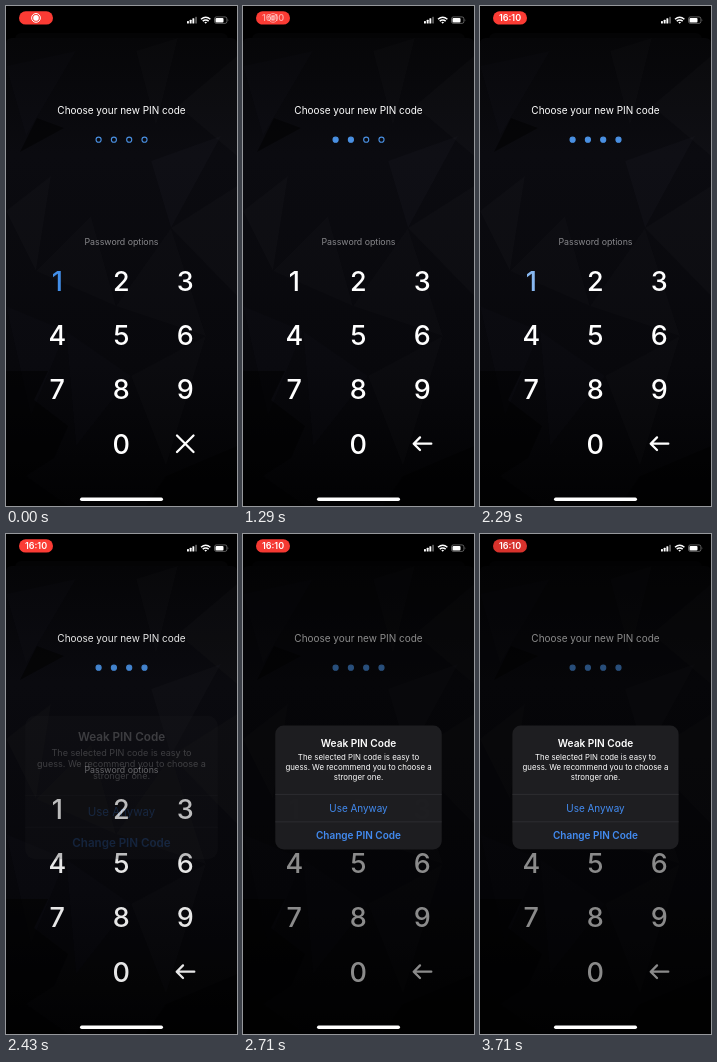
An HTML page that plays this animation: 231x500 px, repeating every 3.85 s.

```html
<!DOCTYPE html>
<html lang="en">
<head>
<meta charset="utf-8">
<title>Choose a PIN code</title>
<style>
  html, body { margin: 0; width: 100%; height: 100%; overflow: hidden; background: #000; }
  svg { display: block; width: 100%; height: 100%; }
  text { font-family: Inter, "Liberation Sans", sans-serif; text-anchor: middle; fill: #fff; }
  .key { font-size: 27px; font-weight: 500; }
  .icon { fill: none; stroke: #fff; stroke-width: 2.3; stroke-linecap: round; stroke-linejoin: round; }
  .blue { fill: #438cf2; }
  .bold { font-weight: 600; }
</style>
</head>
<body>
<svg viewBox="0 0 231 500" preserveAspectRatio="none">
  <defs>
    <linearGradient id="wall" x1="0" y1="0" x2="0" y2="1">
      <stop offset="0" stop-color="#060608"/>
      <stop offset=".25" stop-color="#0b0b10"/>
      <stop offset=".7" stop-color="#08080c"/>
      <stop offset=".9" stop-color="#040406"/>
      <stop offset="1" stop-color="#020203"/>
    </linearGradient>
  </defs>
  <rect width="231" height="500" fill="#000"/>
  <rect x="9" y="27" width="213" height="20" rx="6" fill="#040405"/>
  <path d="M0 500V38Q0 32 6 32H225Q231 32 231 38V500Z" fill="url(#wall)"/>
  <g id="facets" fill="#b0b0cc"></g>
  <path d="M31 112L58 122L14 146ZM0 365H42L28 394L62 420L48 452L20 470L62 500H0ZM160 470L231 440V500H140Z" fill="#000" opacity=".5"/>

  <text x="115.5" y="107.6" font-size="9.98">Choose your new PIN code</text>
  <g id="dots"></g>
  <text x="115.5" y="239.2" font-size="8.8" style="fill:#88888c">Password options</text>
  <g id="keys"></g>
  <path id="cross" class="icon" d="M171 429.5L187.5 446M187.5 429.5L171 446"/>
  <path id="back" class="icon" d="M188.3 437.7H170.8M177 431.4L170.7 437.7L177 444"/>

  <rect id="dim" width="231" height="500" fill="#000"/>

  <g id="alert">
    <rect x="32.4" y="191.5" width="166.2" height="123.8" rx="8.5" fill="#1e1e21"/>
    <path d="M32.4 260.4H198.6M32.4 287.8H198.6" stroke="#343438" stroke-width=".7"/>
    <text class="bold" x="115.5" y="213.2" font-size="10.1">Weak PIN Code</text>
    <g font-size="7.82">
      <text x="115.5" y="226">The selected PIN code is easy to</text>
      <text x="115.5" y="236">guess. We recommend you to choose a</text>
      <text x="115.5" y="246">stronger one.</text>
    </g>
    <text class="blue" x="115.5" y="277.9" font-size="9.9">Use Anyway</text>
    <text class="blue bold" x="115.5" y="305.2" font-size="10">Change PIN Code</text>
  </g>

  <rect id="pill" x="13" y="5.2" width="34" height="13.4" rx="6.7" fill="#fb3b34"/>
  <g id="rec">
    <circle cx="30" cy="11.9" r="4.4" fill="none" stroke="#fff" stroke-width="1"/>
    <circle cx="30" cy="11.9" r="2.8" fill="#fff"/>
  </g>
  <text id="clock" class="bold" x="30" y="15.3" font-size="9">16:10</text>

  <g fill="#fff">
    <rect x="181" y="15" width="1.9" height="2.5" rx=".5"/>
    <rect x="183.7" y="13.7" width="1.9" height="3.8" rx=".5"/>
    <rect x="186.4" y="12.2" width="1.9" height="5.3" rx=".5"/>
    <rect x="189.1" y="10.7" width="1.9" height="6.8" rx=".5" opacity=".35"/>
  </g>
  <g fill="none" stroke="#fff" stroke-width="1.5">
    <path d="M195 13.2Q199.7 9.2 204.4 13.2M196.7 15.1Q199.7 12.7 202.7 15.1"/>
    <path d="M198.3 16.3Q199.7 15.3 201.1 16.3L199.7 17.7Z" fill="#fff" stroke="none"/>
  </g>
  <rect x="208.5" y="10.9" width="12.4" height="6.5" rx="1.9" fill="none" stroke="#fff" stroke-opacity=".5" stroke-width=".7"/>
  <rect x="209.5" y="11.9" width="8" height="4.5" rx="1" fill="#fff"/>
  <path d="M221.8 12.9Q223 14.1 221.8 15.3Z" fill="#fff" opacity=".5"/>
  <rect x="74" y="491.6" width="83" height="3.4" rx="1.7" fill="#fff"/>
</svg>
<script>
const LOOP = 3850, FPS = 7;
const TOUCHES = [[-100, 90], [600, 760], [1340, 1490], [2060, 2230]];
const FILLS = [60, 600, 1340, 2060];
const CLOCK_AT = 1150, ALERT_AT = 2389;
const BLUE = [66, 142, 232], WHITE = [255, 255, 255];

const $ = id => document.getElementById(id);
const clamp = x => Math.min(1, Math.max(0, x));
const ramp = (t, start, length) => clamp((t - start) / length);
const mix = (a, b, k) => `rgb(${a.map((v, i) => Math.round(v + (b[i] - v) * k))})`;

function add(parent, tag, attrs, text = "") {
  const el = document.createElementNS("http://www.w3.org/2000/svg", tag);
  for (const name in attrs) el.setAttribute(name, attrs[name]);
  el.textContent = text;
  return $(parent).appendChild(el);
}

// Faint low-poly wallpaper: outline and opacity
[
  ["0,60 70,45 20,130", .012], ["130,45 172,32 150,120", .014],
  ["172,100 231,50 231,150", .018], ["145,155 215,130 165,222", .025],
  ["0,205 45,170 30,265", .02], ["30,265 85,210 110,300", .016],
  ["165,222 231,180 231,290", .018], ["110,300 165,222 200,330", .014],
  ["0,300 60,325 25,410", .012], ["125,370 200,330 160,460", .014],
  ["60,325 125,370 70,440", .012]
].forEach(([points, opacity]) => add("facets", "polygon", { points, opacity }));

const dots = FILLS.map((_, i) => add("dots", "circle", {
  cx: 92.6 + i * 15.3, cy: 133.7, r: 2.55, fill: "#4a90e2", stroke: "#4a90e2", "stroke-width": 1.1
}));

const keys = [..."1234567890"].map((digit, i) => {
  const col = digit === "0" ? 1 : i % 3, row = Math.floor(i / 3);
  return add("keys", "text", { class: "key", x: 51.3 + col * 64, y: 284.9 + row * 54.2 }, digit);
});

// Critically damped rise from 0 to 1
function spring(ms) {
  const x = Math.max(0, ms) * .0214;
  return 1 - (1 + x) * Math.exp(-x);
}

function draw(t) {
  const glow = Math.max(...TOUCHES.map(([down, up]) =>
    t < down ? 0 : 1 - ramp(t, up, 150)));
  keys[0].style.fill = mix(WHITE, BLUE, glow);

  dots.forEach((dot, i) => dot.setAttribute("fill-opacity", ramp(t, FILLS[i], 80)));
  const typed = t >= FILLS[0];
  $("cross").setAttribute("opacity", typed ? 0 : 1);
  $("back").setAttribute("opacity", typed ? 1 : 0);

  const clock = ramp(t, CLOCK_AT, 250);
  $("rec").setAttribute("opacity", 1 - clock);
  $("clock").setAttribute("opacity", clock);
  $("pill").setAttribute("opacity", 1 - .14 * ramp(t, 2500, 1200));

  const shown = spring(t - ALERT_AT);
  $("dim").setAttribute("opacity", .46 * shown);
  $("alert").setAttribute("opacity", shown);
  $("alert").setAttribute("transform",
    `translate(115.5 253) scale(${1 + .2 * (1 - shown)}) translate(-115.5 -253)`);
}

function stepTime(ms) {
  const cs = Math.floor((ms % LOOP) / 10);
  return Math.floor((cs + .5) * FPS / 100) * 1000 / FPS;
}

const begin = performance.now();
function tick() {
  draw(stepTime(performance.now() - begin));
  requestAnimationFrame(tick);
}
tick();
</script>
</body>
</html>
```
